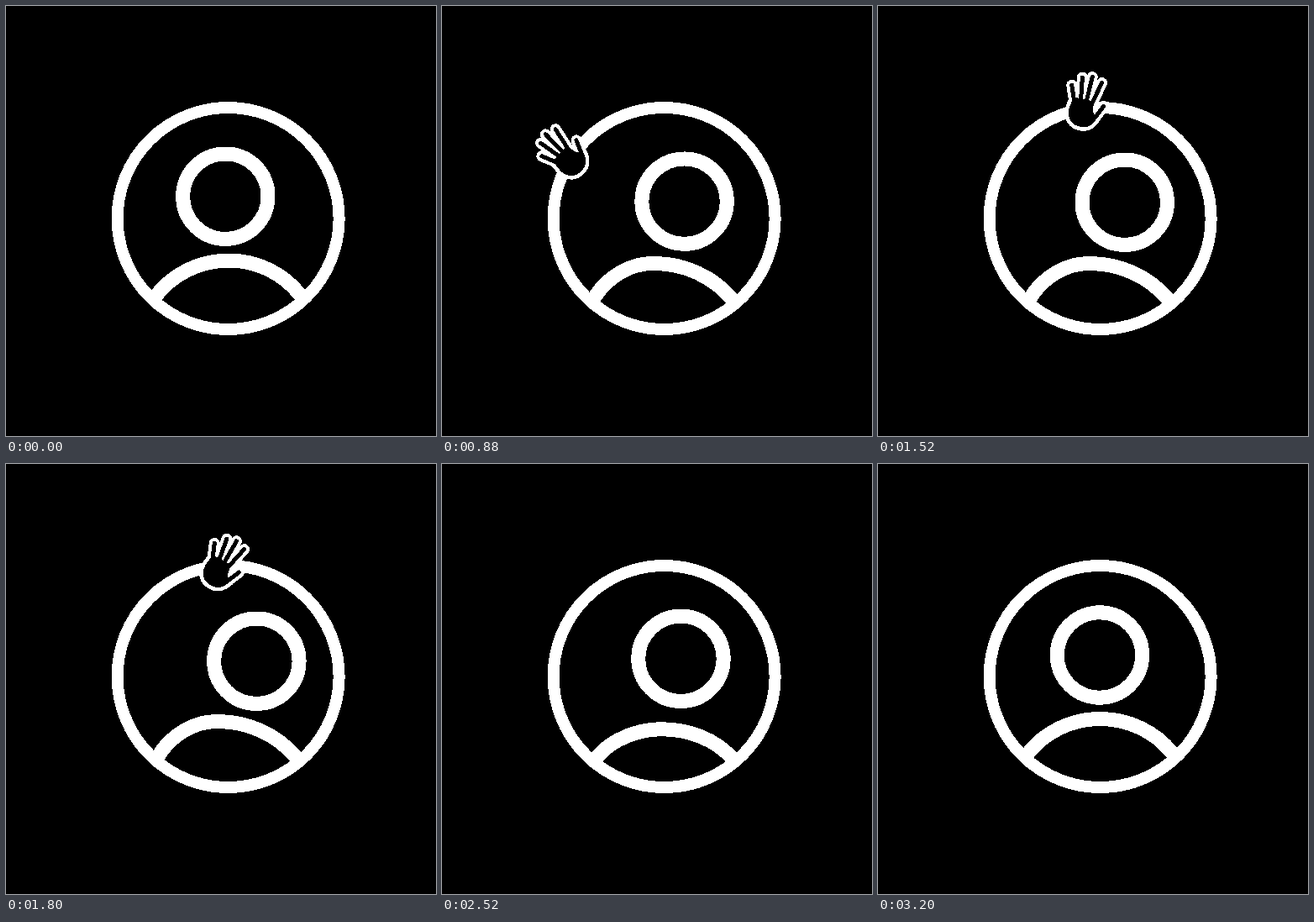
Recreate the animation shown at these times as an HTML page. Size 512 by 512 pixels, loop 4080 ms.

```html
<!DOCTYPE html>
<html lang="en">
<head>
<meta charset="utf-8">
<title>Waving avatar</title>
<style>
  html, body { margin: 0; width: 100%; height: 100%; overflow: hidden; background: #000; }
  svg { display: block; width: 100vw; height: 100vh; shape-rendering: crispEdges; }
  .line { fill: none; stroke: #fff; }
  .outline { fill: #fff; stroke: #fff; }
  .inside { fill: #000; stroke: #000; }
  #hand { stroke-linecap: round; stroke-linejoin: round; }
</style>
</head>
<body>
<svg viewBox="0 0 512 512">
  <defs>
    <clipPath id="disc"><circle cx="264.6" cy="253" r="138"/></clipPath>
    <path id="palm" d="M-16-18L-18-4C-18 9-10 14-1 14C9 14 13 8 16 0L10-5L8-18Z"/>
    <path id="fingers" d="M-21-32L-15-16M-10.5-43.5L-7-18M1-46.5L0-18M13.5-42L7-16M21-15L14 0"/>
  </defs>
  <path id="body" class="line" stroke-width="17" clip-path="url(#disc)"/>
  <circle id="head" class="line" r="50.7" stroke-width="17"/>
  <circle class="line" cx="264.6" cy="253" r="132" stroke-width="14"/>
  <g id="hand">
    <g class="outline">
      <use href="#palm" stroke-width="10"/>
      <use href="#fingers" stroke-width="13"/>
    </g>
    <g class="inside">
      <use href="#palm" stroke-width="1"/>
      <use href="#fingers" stroke-width="5"/>
    </g>
  </g>
</svg>
<script>
const LOOP = 4080, STEP = 40;
const CX = 264.6, CY = 253;
const $ = id => document.getElementById(id);
const head = $('head'), body = $('body'), hand = $('hand');

const part = (t, from, to) => Math.min(1, Math.max(0, (t - from) / (to - from)));

// Smooth 0 to 1 between two times.
function ease(t, from, to) {
  const u = part(t, from, to);
  return u * u * (3 - 2 * u);
}

// Smooth 0 to 1 and back to 0.
const bump = (t, from, to) => Math.sin(Math.PI * part(t, from, to)) ** 2;

// Look left, duck, look right and drift, wind up, return to the middle.
function pose(t) {
  const left = ease(t, -50, 240) - ease(t, 440, 700);
  const turn = ease(t, 640, 900) - ease(t, 2300, 2600);
  const reach = (25 * ease(t, 640, 900) + 9.5 * ease(t, 1200, 1840)) * (1 - ease(t, 2360, 2726));
  const duck = bump(t, 500, 840);
  const lift = 6.5 * bump(t, 2120, 2400);
  const sink = 12 * (ease(t, 2300, 2540) - ease(t, 2560, 3200));
  return {
    x: 264 - 34 * left + reach + 7 * bump(t, 2240, 2480),
    y: 227.5 - 10 * left + 18 * duck + 0.21 * reach - lift,
    peakX: 264.5 + 13 * (left - turn),
    peakY: 303.5 - 5.5 * left + 7.5 * duck + 3 * turn - lift + sink,
    lean: turn - left
  };
}

// Half of the shoulder arc, from the ring to the peak.
function shoulder(side, degrees, peakX, peakY) {
  const a = degrees * Math.PI / 180;
  const x = CX + side * 125 * Math.sin(a), y = CY + 125 * Math.cos(a);
  const dx = peakX - x, dy = peakY - y;
  const hx = x + 0.235 * dx, hy = y + 0.627 * dy;
  const len = Math.hypot(hx - x, hy - y);
  return {
    tail: [x - 8 * (hx - x) / len, y - 8 * (hy - y) / len],
    end: [x, y],
    grip: [hx, hy],
    top: [peakX - 0.394 * dx, peakY]
  };
}

function drawBody({ peakX, peakY, lean }) {
  const angle = 43.2 - 0.25 * (peakY - 303.5) - Math.abs(lean);
  const l = shoulder(-1, angle + 1.5 * Math.min(0, lean), peakX, peakY);
  const r = shoulder(1, angle - 1.5 * Math.max(0, lean), peakX, peakY);
  body.setAttribute('d',
    `M${l.tail}L${l.end}C${l.grip} ${l.top} ${peakX},${peakY}` +
    `C${r.top} ${r.grip} ${r.end}L${r.tail}`);
}

// The hand slides up along the ring, waves, then pops away.
function drawHand(t) {
  const angle = -72 * (1 - ease(t, 720, 1120));
  const scale = ease(t, 720, 840) * (1 - ease(t, 2320, 2480)) + 0.2 * bump(t, 2240, 2400);
  const waving = Math.min(2240, Math.max(1210, t)) - 1210;
  const wave = 0.5 - 0.5 * Math.cos(waving / 400 * 2 * Math.PI);
  hand.style.display = t > 720 && t < 2480 ? '' : 'none';
  hand.setAttribute('transform',
    `rotate(${angle} ${CX} ${CY}) ` +
    `translate(${239.5 + 12.5 * wave} ${128 + 4.5 * wave}) rotate(${28 * wave}) ` +
    `translate(0 19) scale(${scale}) translate(0 -19)`);
}

function draw(time) {
  const t = Math.floor((time % LOOP) / STEP) * STEP;
  const now = pose(t);
  head.setAttribute('cx', now.x);
  head.setAttribute('cy', now.y);
  drawBody(now);
  drawHand(t);
}

const start = performance.now();
function tick() {
  draw(performance.now() - start);
  requestAnimationFrame(tick);
}
tick();
</script>
</body>
</html>
```
